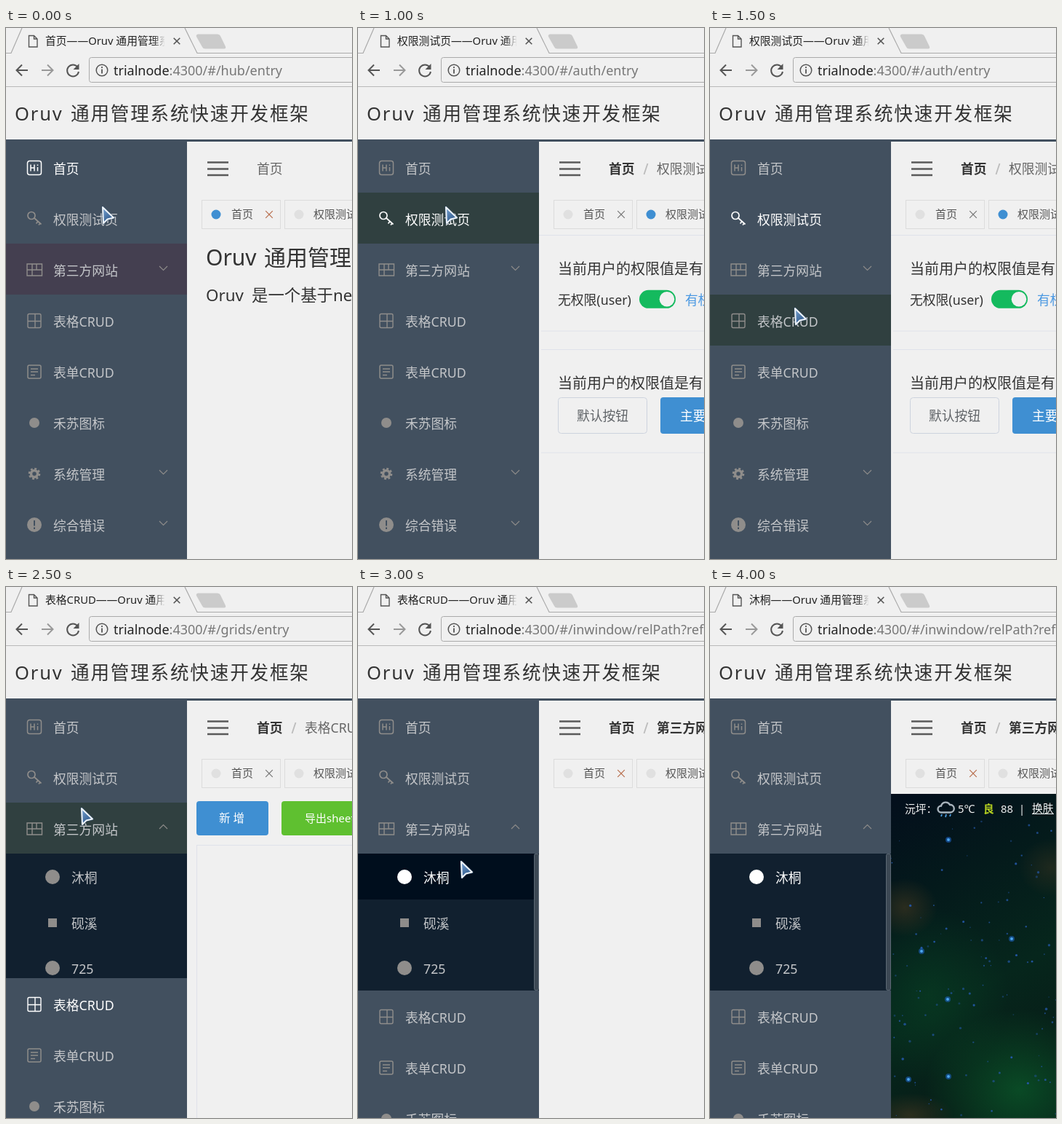
These frames come from a looping animation (476 by 729 pixels, 4500 ms). An HTML page:

```html
<!DOCTYPE html>
<html lang="zh">
<head>
<meta charset="utf-8">
<title>管理系统</title>
<style>
html, body { margin: 0; width: 100%; height: 100%; overflow: hidden; background: #f0f0f0; }
svg { display: block; width: 100%; height: 100%; }
text { font-family: "Noto Sans", "Noto Sans CJK SC", "Noto Sans CJK", sans-serif; white-space: pre; }
</style>
</head>
<body>
<svg id="stage" viewBox="0 0 476 729">
  <defs>
    <linearGradient id="fade" x1="0" x2="1">
      <stop offset="0" stop-color="#f0f0f0" stop-opacity="0"/>
      <stop offset="1" stop-color="#f0f0f0"/>
    </linearGradient>
    <linearGradient id="sky" x1="0" y1="0" x2="0.3" y2="1">
      <stop offset="0" stop-color="#030e1c"/>
      <stop offset="0.35" stop-color="#041a1b"/>
      <stop offset="0.7" stop-color="#06261c"/>
      <stop offset="1" stop-color="#071d17"/>
    </linearGradient>
    <radialGradient id="glow">
      <stop offset="0" stop-color="#0a5228" stop-opacity="0.85"/>
      <stop offset="1" stop-color="#0a5228" stop-opacity="0"/>
    </radialGradient>
    <radialGradient id="dust">
      <stop offset="0" stop-color="#3a3420" stop-opacity="0.7"/>
      <stop offset="1" stop-color="#3a3420" stop-opacity="0"/>
    </radialGradient>
    <linearGradient id="arrow" x1="0" y1="0" x2="0.5" y2="1">
      <stop offset="0" stop-color="#7ba6d6"/>
      <stop offset="1" stop-color="#2c5688"/>
    </linearGradient>
    <clipPath id="titleClip"><rect x="50" y="0" width="168" height="34"/></clipPath>
    <clipPath id="page"><rect x="249" y="284" width="227" height="445"/></clipPath>
  </defs>
  <g id="view"></g>
</svg>
<script>
const BRAND = 'Oruv';
const BAR = '#42505f', BG = '#f0f0f0', BLUE = '#3f8fd2', GREY = '#8f8d8b';
const STEP = 500, LOOP = 4500;

const text = (x, y, s, size, fill, more = '') =>
  `<text x="${x}" y="${(y + size * 0.37).toFixed(2)}" font-size="${size}" fill="${fill}" ${more}>${s}</text>`;
const rect = (x, y, w, h, fill, more = '') =>
  `<rect x="${x}" y="${y}" width="${w}" height="${h}" fill="${fill}" ${more}/>`;
const disc = (x, y, r, fill, more = '') => `<circle cx="${x}" cy="${y}" r="${r}" fill="${fill}" ${more}/>`;
const line = (d, stroke, w = 1, more = '') =>
  `<path d="${d}" fill="none" stroke="${stroke}" stroke-width="${w}" ${more}/>`;
const cross = (x, y, r, color, w) =>
  line(`M${x - r} ${y - r}l${2 * r} ${2 * r}m0 ${-2 * r}l${-2 * r} ${2 * r}`, color, w);

function random(seed) {
  return () => (seed = (seed * 16807) % 2147483647) / 2147483647;
}

// Menu icons, drawn around (0, 0)
const icons = {
  hi: c => line('M-6.5-9.5h13a3 3 0 0 1 3 3v13a3 3 0 0 1-3 3h-13a3 3 0 0 1-3-3v-13a3 3 0 0 1 3-3z', c, 1.5) +
    line('M-5-4.5v9M0-4.5v9M-5 0h5M4.5-1v5.5M4.5-4.5v1.5', c, 1.5),
  key: c => disc(-4, -4.5, 5, 'none', `stroke="${c}" stroke-width="1.7"`) + line('M0-1L9.5 7.5M5 3.5l-2.5 3M8 6l-2 2.5', c, 1.7),
  bricks: c => line('M-10-8h20.5v16h-20.5zM-10 0h20.5M3-8v8M-3 0v8M-3-8v8', c, 1.4),
  grid: c => line('M-7-9.5h14a2 2 0 0 1 2 2v15a2 2 0 0 1-2 2h-14a2 2 0 0 1-2-2v-15a2 2 0 0 1 2-2zM1-9.5v19M-9 0.5h18', c, 1.4),
  form: c => line('M-7-9h14a2 2 0 0 1 2 2v14a2 2 0 0 1-2 2h-14a2 2 0 0 1-2-2v-14a2 2 0 0 1 2-2zM-5-4h10M-5 0h10M-5 4.5h6', c, 1.5),
  dot: c => disc(0, 0, 7, c),
  gear: c => disc(0, 0, 4.5, 'none', `stroke="${c}" stroke-width="3.5"`) +
    disc(0, 0, 7, 'none', `stroke="${c}" stroke-width="2.6" stroke-dasharray="2.9 2.6"`),
  alert: c => disc(0, 0, 10, c) + line('M0-6v7.5M0 3.5v2.5', BAR, 2),
  disc: c => disc(0, 0, 10, c),
  square: c => rect(-6, -6, 12, 12, c)
};
const icon = (name, x, y, color) => `<g transform="translate(${x} ${y})">${icons[name](color)}</g>`;

const menu = [
  ['hi', '首页'], ['key', '权限测试页'], ['bricks', '第三方网站'], ['grid', '表格CRUD'],
  ['form', '表单CRUD'], ['dot', '禾苏图标'], ['gear', '系统管理'], ['alert', '综合错误']
];
const links = [['disc', '沐桐', 399], ['square', '砚溪', 462], ['disc', '725', 524]];

function chrome(s) {
  const ink = '#555';
  return rect(0, 0, 476, 156, BG) +
    line('M0 34.5H7L22 0M246 0L263 34.5H476', '#aaa', 1.2) +
    '<path d="M264 8.5h27q3 0 4 2.5l7 14.5q1 3-2 3h-26q-3 0-4-2.5l-8-14q-1-3 2-3.5z" fill="#cbcbcb"/>' +
    line('M31.5 10.5h7l4.5 4.5v11h-11.5zM38.5 10.5v4.5h4.5', ink, 1.4) +
    `<g clip-path="url(#titleClip)">${text(54, 18, `${s.title}——${BRAND} 通用管理系统`, 14.8, '#222')}</g>` +
    rect(202, 6, 17, 24, 'url(#fade)') +
    cross(235, 18, 4.3, ink, 1.6) +
    line('M30 58H15M22 50.5L14.5 58L22 65.5', ink, 2) +
    line('M49 58H64M57 50.5L64.5 58L57 65.5', '#999', 2) +
    line('M98.5 53.5A8 8 0 1 0 100 60', ink, 2) +
    '<path d="M100.5 49v8h-8z" fill="#555"/>' +
    rect(114.5, 40.5, 380, 34, BG, 'rx="3" stroke="#aaa"') +
    disc(132, 58, 7.8, 'none', 'stroke="#555" stroke-width="1.5"') + line('M132 56.5v6M132 53v2', ink, 1.8) +
    text(148, 58, `trialnode<tspan fill="#777">:4300/#/${s.path}</tspan>`, 18, '#222') +
    line('M0 80.5H476', '#b9b9b9') +
    text(12, 118, BRAND, 25.6, '#333', 'letter-spacing="1.8"') +
    text(89, 118, '通用管理系统快速开发框架', 25.6, '#333', 'letter-spacing="1.8"') +
    rect(0, 153, 476, 3, BAR);
}

function sidebar(s) {
  let out = rect(0, 153, 249, 576, BAR);
  menu.forEach(([name, label], i) => {
    const top = 156 + 70 * i + (i > 2 ? s.open : 0), y = top + 37;
    const on = i === s.active;
    if (i === s.hover) out += rect(0, top, 249, 70, s.tint || '#304040');
    out += icon(name, 39, y - 1, on ? '#fff' : GREY) + text(65, y, label, 17.8, on ? '#fff' : '#c4c6c9');
    if (i === 2 || i > 5) {
      out += line(i === 2 && s.open ? `M211 ${y - 1}l5.5-5.5l5.5 5.5` : `M211 ${y - 6}l5.5 5.5l5.5-5.5`, GREY, 1.1);
    }
  });
  return s.open ? out + submenu(s) : out;
}

function submenu(s) {
  let out = rect(0, 366, 249, s.open, '#11202f');
  if (s.linkHover) out += rect(0, 366, 242, 63, '#000e1d');
  links.forEach(([name, label, y], i) => {
    const on = s.link && i === 0;
    out += icon(name, 64, y - 1, on ? '#fff' : GREY) + text(90, y, label, 17.8, on ? '#fff' : '#c4c6c9');
  });
  if (s.open === 188) out += rect(242.5, 366.5, 6, 187, '#3c4854', 'rx="2" stroke="#5c6874"');
  return out;
}

function topbar(s) {
  const bold = 'font-weight="700"';
  let out = rect(249, 156, 227, 573, BG) +
    line('M277 184.5h29M277 193.5h29M277 202h29', '#5a5a5a', 2.6) +
    text(345, 193, '首页', 17.8, s.crumb ? '#333' : '#666', s.crumb ? bold : '');
  if (s.crumb) {
    out += line('M393.5 201L398.5 186', '#bbb', 1.8) +
      text(411, 193, s.crumb, 17.8, s.link ? '#333' : '#666', s.link ? bold : '');
  }
  return out +
    rect(269.5, 236.5, 108, 39, BG, 'stroke="#dcdcdc"') + rect(383.5, 236.5, 130, 39, BG, 'stroke="#dcdcdc"') +
    disc(289, 256, 6.5, s.tab === 0 ? BLUE : '#e0e0e0') + text(310, 255.5, '首页', 15, '#555') +
    cross(362, 256, 4.8, s.warm ? '#b86f4e' : '#777', 1.2) +
    disc(403, 256, 6.5, s.tab === 1 ? BLUE : '#e0e0e0') + text(423, 255.5, '权限测试页', 15, '#555');
}

const pages = {
  home: () =>
    text(275, 315, BRAND, 30, '#333') + text(355, 315, '通用管理系统', 30, '#333') +
    text(275, 367, BRAND, 22.4, '#333') + text(338, 367, '是一个基于nem', 22.4, '#333'),

  role: () =>
    line('M249 284.5H476M252 416H476M252 441.5H476M252 583H476', '#dfe2ea') +
    text(275, 331, '当前用户的权限值是有', 20, '#333') +
    text(275, 373, '无权限(user)', 17.8, '#333') +
    rect(387, 359.8, 50, 25, '#14ba5e', 'rx="12.5"') + disc(425, 372.3, 10.3, BG) +
    text(450, 373, '有权限', 17.8, '#4a98e2') +
    text(275, 488, '当前用户的权限值是有', 20, '#333') +
    rect(275.5, 507.5, 122, 49, BG, 'rx="4" stroke="#cdd3de"') + text(301, 532, '默认按钮', 17.8, '#606468') +
    rect(416, 507, 123, 50, BLUE, 'rx="4"') + text(443, 532, '主要按钮', 17.8, '#fff'),

  table: () =>
    rect(262, 294, 99, 47, BLUE, 'rx="4"') + text(293, 317.5, '新 增', 15.5, '#fff', 'font-weight="500"') +
    rect(379, 294, 130, 47, '#5fc030', 'rx="4"') + text(411, 317.5, '导出sheet', 15, '#fff', 'font-weight="500"') +
    rect(262.5, 354.5, 300, 400, 'none', 'stroke="#dfe2ea"'),

  blank: () => '',

  night() {
    const rnd = random(77);
    let out = rect(249, 284, 227, 445, 'url(#sky)') +
      '<ellipse cx="425" cy="690" rx="130" ry="110" fill="url(#glow)"/>' +
      '<ellipse cx="300" cy="560" rx="110" ry="120" fill="url(#glow)" opacity="0.45"/>' +
      '<ellipse cx="268" cy="440" rx="45" ry="40" fill="url(#dust)"/>' +
      '<ellipse cx="470" cy="385" rx="45" ry="40" fill="url(#dust)" opacity="0.7"/>' +
      '<ellipse cx="275" cy="725" rx="60" ry="30" fill="url(#dust)"/>';
    for (let i = 0; i < 110; i++) {
      out += disc((249 + rnd() * 227).toFixed(1), (320 + rnd() * 409).toFixed(1), (0.6 + rnd() * 1.2).toFixed(1),
        '#2458a8', `opacity="${(0.4 + rnd() * 0.6).toFixed(2)}"`);
    }
    for (const [x, y] of [[291, 500], [327, 566], [328, 672], [273, 676], [415, 483], [328, 347]]) {
      out += disc(x, y, 4, '#1c62c0', 'opacity="0.6"') + disc(x, y, 2, '#4ca6ee');
    }
    const white = '#f4f4f4', y = 305;
    out += text(268, y, '沅坪：', 14.8, white) +
      line('M318 309.5a4.5 4.5 0 0 1 0-9a6.5 6.5 0 0 1 12-1.5a5 5 0 0 1 1 10.5z', '#a9b4bd', 2.4) +
      line('M319 312l-1 3M325 312l-1 4M331 312l-1 3', '#4b9bdc', 1.8) +
      text(341, y, '5℃', 14.8, white) +
      text(376, y, '良', 14.8, '#b4d020', 'font-weight="700"') +
      text(400, y, '88', 14.8, white) + text(425, y, '|', 14.8, white) +
      text(443, 304, '换肤', 14.8, white) + line('M443 311.5h30', white);
    return `<g clip-path="url(#page)">${out}</g>`;
  }
};

const pointer = ([x, y]) => `<g transform="translate(${x} ${y})" stroke-linejoin="round">` +
  '<path d="M0 0L1 22L6.5 16.5L15 14.5Z" fill="#33506f" stroke="#33506f" stroke-width="3.5" opacity="0.55"/>' +
  '<path d="M0 0L1 22L6.5 16.5L15 14.5Z" fill="url(#arrow)" stroke="#eef4fa" stroke-width="2"/></g>';

const home = { title: '首页', path: 'hub/entry', active: 0, tab: 0, warm: true, open: 0, page: 'home' };
const role = { title: '权限测试页', path: 'auth/entry', active: 1, tab: 1, open: 0, crumb: '权限测试页', page: 'role' };
const table = { title: '表格CRUD', path: 'grids/entry', active: 3, open: 0, crumb: '表格CRUD', page: 'table' };
const site = { title: '沐桐', path: 'inwindow/relPath?ref=', link: true, warm: true, open: 188, crumb: '第三方网站', page: 'blank' };

const scenes = [
  { ...home, hover: 2, tint: '#443f50', mouse: [133, 246] },
  { ...home, hover: 1, mouse: [127, 246] },
  { ...role, hover: 1, mouse: [121, 246] },
  { ...role, hover: 3, mouse: [117, 385] },
  { ...table, hover: 3, warm: true, mouse: [115, 281] },
  { ...table, hover: 2, open: 171, mouse: [104, 304] },
  { ...site, title: '表格CRUD', linkHover: true, mouse: [142, 377] },
  { ...site, linkHover: true, mouse: [175, 372] },
  { ...site, page: 'night' }
];

const view = document.getElementById('view');
let shown = -1;

function draw(ms) {
  const i = Math.floor((ms % LOOP) / STEP);
  if (i === shown) return;
  shown = i;
  const s = scenes[i];
  view.innerHTML = topbar(s) + pages[s.page]() + sidebar(s) + chrome(s) + (s.mouse ? pointer(s.mouse) : '');
}

const start = performance.now();
function tick() {
  draw(performance.now() - start);
  requestAnimationFrame(tick);
}
tick();
</script>
</body>
</html>
```
